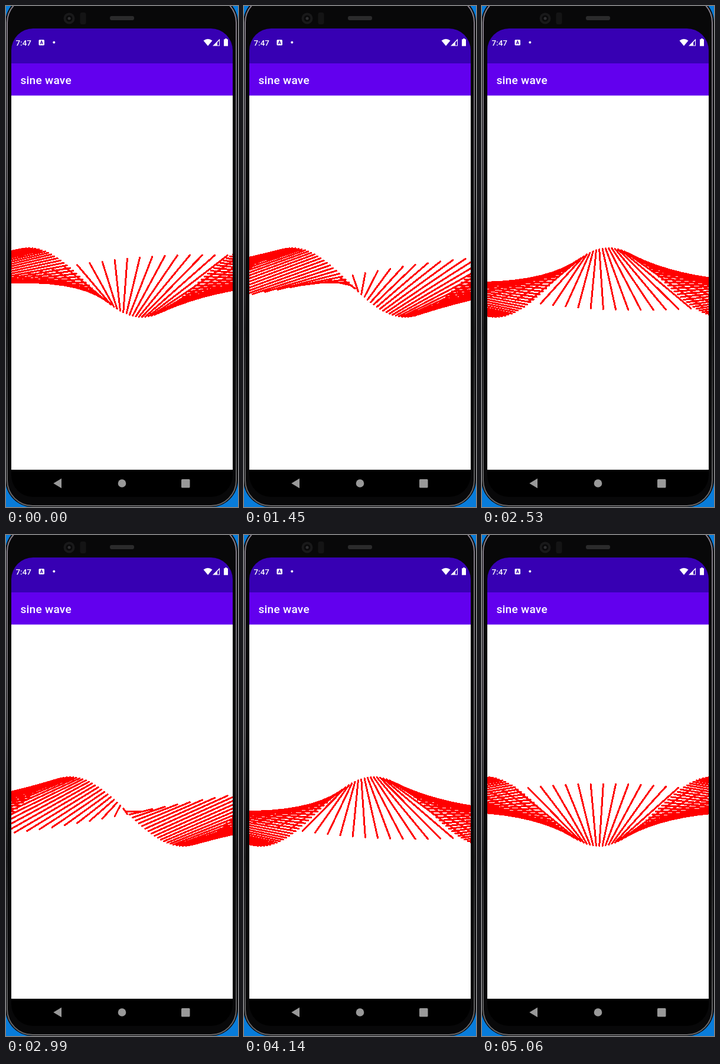
Recreate the animation shown at these times as an HTML page. Size 393 px wide and 847 px high, loop 5130 ms.

```html
<!DOCTYPE html>
<html lang="en">
<head>
<meta charset="utf-8">
<title>Sine wave</title>
<style>
  html, body { margin: 0; width: 100%; height: 100%; overflow: hidden; background: #087cda; }
  svg { display: block; }
  text { font-family: Roboto, sans-serif; font-weight: 500; fill: #fff; }
</style>
</head>
<body>
<svg width="393" height="847" viewBox="0 0 393 847">
  <defs>
    <clipPath id="screen"><rect x="9" y="38" width="375" height="792" rx="37"/></clipPath>
    <clipPath id="view"><rect x="9" y="151" width="375" height="633"/></clipPath>
    <linearGradient id="rim" x1="0" y1="0" x2="0" y2="1">
      <stop offset="0" stop-color="#87808c"/>
      <stop offset=".4" stop-color="#666468"/>
      <stop offset=".65" stop-color="#232325"/>
      <stop offset="1" stop-color="#6a6a6c"/>
    </linearGradient>
  </defs>

  <!-- phone body -->
  <rect x="-1" y="-18" width="394" height="865" rx="46" fill="#0a0a0c"/>
  <rect x="2" y="-15" width="388" height="860" rx="43" fill="#080809" stroke="url(#rim)" stroke-width="2"/>
  <circle cx="107" cy="21" r="9.5" fill="#19191a"/>
  <circle cx="107" cy="21" r="5.5" fill="#0a0a0b"/>
  <circle cx="107" cy="21" r="2.5" fill="#303032"/>
  <rect x="125.5" y="11" width="10" height="20" rx="3" fill="#141415"/>
  <rect x="176" y="17" width="41" height="7" rx="3" fill="#2b2b2c"/>

  <!-- screen -->
  <g clip-path="url(#screen)">
    <rect x="9" y="38" width="375" height="792"/>
    <rect x="9" y="38" width="375" height="59" fill="#3700b3"/>
    <rect x="9" y="151" width="375" height="633" fill="#fff"/>
    <rect x="9" y="97" width="375" height="54.4" fill="#6200ee"/>
  </g>

  <!-- status bar -->
  <text x="16.5" y="67" font-size="13.4">7:47</text>
  <rect x="55.5" y="57" width="9.5" height="9.5" rx="1.5" fill="#fff"/>
  <path d="M58 64.5L60.2 59L62.5 64.5M58.8 62.9H61.7" fill="none" stroke="#3700b3" stroke-width="1.1"/>
  <circle cx="81.3" cy="61.5" r="2" fill="#fff"/>
  <g fill="#fff">
    <path d="M334.5 58.5Q342 53 349.5 58.5L342 67.5Z"/>
    <path d="M350 67.5L362 55.5V67.5Z"/>
    <path d="M358 61.5L361 58.5V66.5H358Z" fill="#3700b3"/>
    <path d="M371 55H374V56.3H376V67.7H369V56.3H371Z"/>
  </g>
  <text x="24.4" y="132" font-size="19.1" letter-spacing=".24">sine wave</text>

  <!-- navigation bar -->
  <g fill="#999">
    <path d="M80.3 807L94 798.8V815.2Z"/>
    <circle cx="196.5" cy="807" r="6.8"/>
    <rect x="297" y="800" width="14.5" height="14.5" rx="1.5"/>
  </g>

  <path id="wave" clip-path="url(#view)" fill="none" stroke="#f00" stroke-width="3"
    stroke-linecap="round" shape-rendering="crispEdges"/>
</svg>
<script>
const LOOP = 5130, TICK = 5060 / 66, LEAD = 27;
const CX = 196.5, CY = 467.5;
const STEP = Math.PI / 36;     // 5 degrees between neighbouring lines
const OFFSET = 0.42;           // first line's distance from the centre, in lines
const SPEED = 3.37;            // lines the wave moves left per tick
const NEAR = { dx: 5.303, amp: 58 };
const FAR = { dx: 21.21, amp: -46.4 };

const path = document.getElementById("wave");

function point(end, i, s) {
  const x = CX + end.dx * (i + OFFSET), y = CY + end.amp * s;
  return x.toFixed(2) + " " + y.toFixed(2);
}

function draw(time) {
  const tick = Math.floor((time % LOOP + LEAD) / TICK);
  const trough = Math.round(6.25 - SPEED * tick);
  let d = "";
  for (let i = -38; i <= 38; i++) {
    const s = Math.cos((i - trough) * STEP);
    d += "M" + point(NEAR, i, s) + "L" + point(FAR, i, s);
  }
  path.setAttribute("d", d);
}

const start = performance.now();
function loop() {
  draw(performance.now() - start);
  requestAnimationFrame(loop);
}
loop();
</script>
</body>
</html>
```
